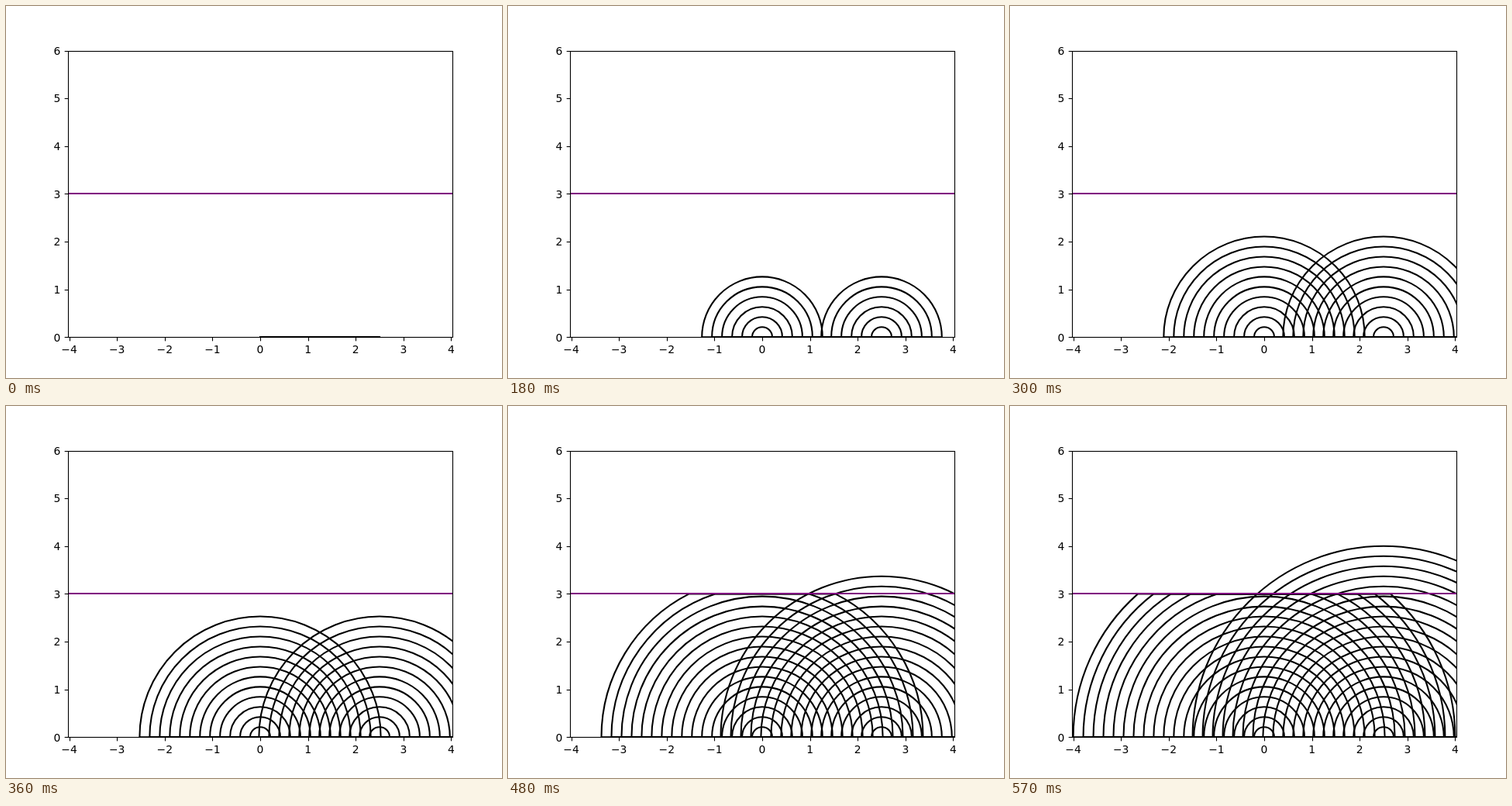
Recreate the animation shown at these times as an HTML page with a canvas. Size 640x480 px, loop 600 ms.

```html
<!DOCTYPE html>
<html>
<head>
<meta charset="utf-8">
<style>
  html, body { margin: 0; height: 100%; overflow: hidden; background: #fff; }
  canvas { display: block; }
</style>
</head>
<body>
<canvas id="stage" width="640" height="480"></canvas>
<script>
const ctx = document.getElementById('stage').getContext('2d');
const UNIT = 61.6, LEFT = 80, RIGHT = 576, TOP = 57.6, BOTTOM = 427.2;
const STEPS = 20, STEP_MS = 30, MAX_RADIUS = 4, WALL = 3;
const px = x => 328 + x * UNIT;
const py = y => BOTTOM - y * UNIT;
const snap = v => Math.floor(v + 0.5) + 0.5;

function line(x1, y1, x2, y2) {
  ctx.beginPath();
  ctx.moveTo(x1, y1);
  ctx.lineTo(x2, y2);
  ctx.stroke();
}

// One stroke: left half circle cut flat at the wall, then the free right one.
function wavefront(radius) {
  const r = radius * UNIT;
  const y = r ? BOTTOM : Math.round(BOTTOM);
  const cut = Math.asin(Math.min(1, WALL / radius));
  ctx.beginPath();
  ctx.arc(px(0), y, r, 0, -cut, true);
  ctx.arc(px(0), y, r, cut - Math.PI, -Math.PI, true);
  ctx.arc(px(2.5), y, r, 0, -Math.PI, true);
  ctx.stroke();
}

function drawAxes() {
  ctx.strokeStyle = ctx.fillStyle = '#000';
  ctx.lineWidth = 1.11;
  ctx.lineCap = 'butt';
  ctx.font = '13.89px "DejaVu Sans", sans-serif';
  const base = snap(BOTTOM);
  ctx.strokeRect(snap(LEFT), snap(TOP), RIGHT - LEFT, base - snap(TOP));

  ctx.textAlign = 'center';
  for (let x = -4; x <= 4; x++) {
    const tx = snap(px(x));
    line(tx, base, tx, base + 4.86);
    ctx.fillText(String(x).replace('-', '\u2212'), px(x), 448);
  }
  ctx.textAlign = 'right';
  for (let y = 0; y <= 6; y++) {
    const ty = snap(py(y));
    line(snap(LEFT), ty, snap(LEFT) - 4.86, ty);
    ctx.fillText(y, 70.3, Math.round(py(y) + 5.3));
  }
}

function draw(now) {
  const step = Math.floor(now / STEP_MS) % STEPS;
  ctx.fillStyle = '#fff';
  ctx.fillRect(0, 0, 640, 480);

  ctx.save();
  ctx.beginPath();
  ctx.rect(LEFT, 57, RIGHT - LEFT + 1, 371);
  ctx.clip();
  ctx.lineWidth = 2.083;
  ctx.lineCap = 'square';
  ctx.lineJoin = 'round';
  ctx.strokeStyle = '#000';
  for (let i = 0; i <= step; i++) wavefront(MAX_RADIUS * i / (STEPS - 1));
  ctx.strokeStyle = 'purple';
  const wallY = Math.round(py(WALL));
  line(LEFT, wallY, RIGHT, wallY);
  ctx.restore();

  drawAxes();
}

const start = performance.now();
function tick() {
  draw(performance.now() - start);
  requestAnimationFrame(tick);
}
tick();
</script>
</body>
</html>
```
